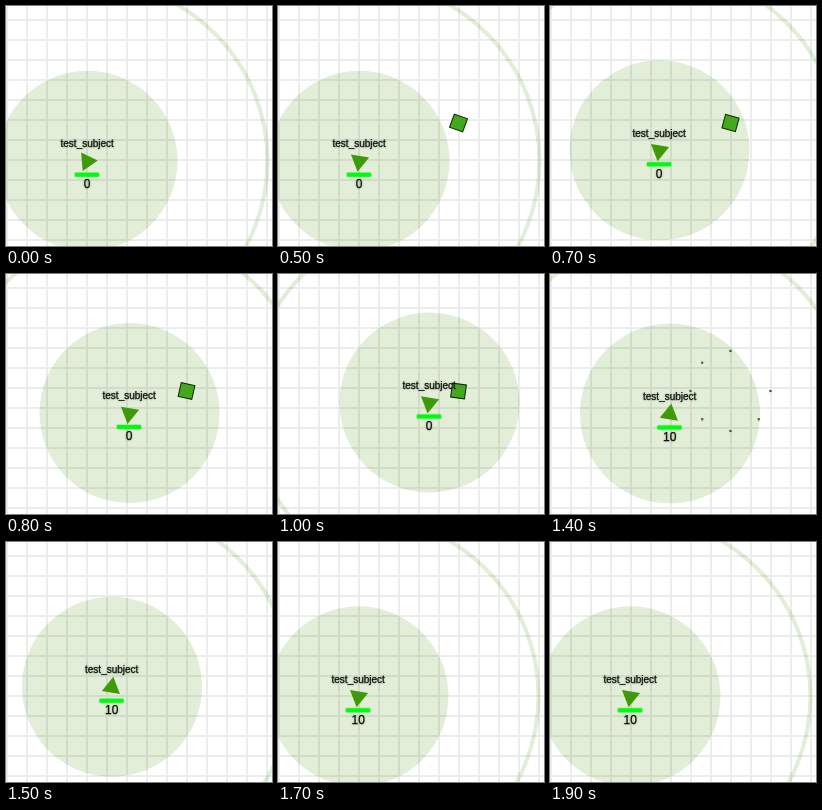
Animation of 266 by 240 pixels, one loop 2000 ms. Source, as an HTML page:

```html
<!DOCTYPE html>
<html lang="en">
<head>
<meta charset="utf-8">
<style>
  html, body { margin: 0; width: 100%; height: 100%; overflow: hidden; background: #fff; }
  svg { display: block; width: 266px; height: 240px; }
  text {
    font-family: "Liberation Sans", Arial, sans-serif;
    text-anchor: middle;
    fill: #111;
    stroke: #111;
    stroke-width: .25;
    filter: drop-shadow(0 0 1px rgba(70, 100, 50, .45));
  }
</style>
</head>
<body>
<svg viewBox="0 0 266 240">
  <defs>
    <pattern id="grid" x="0" y="13" width="20" height="20" patternUnits="userSpaceOnUse">
      <path d="M1 0V20M0 1H20" stroke="#000" stroke-opacity=".075" stroke-width="2"/>
    </pattern>
  </defs>
  <rect width="266" height="240" fill="#fff"/>
  <g class="unit">
    <circle r="90" fill="#e2eed8"/>
    <circle r="180" fill="none" stroke="#e2eed8" stroke-width="4"/>
  </g>
  <rect width="266" height="240" fill="url(#grid)"/>
  <rect id="crate" x="-7" y="-7" width="14" height="14" fill="#43a81e" stroke="#10240a"/>
  <g id="shards"></g>
  <g class="unit">
    <path id="ship" d="M10.6 0L-5.3 9.2V-9.2Z" fill="#3f9a08"/>
    <rect x="-13.5" y="11.3" width="26" height="5.4" rx="2" fill="#00f010" opacity=".3"/>
    <rect x="-12.5" y="12" width="24" height="4" rx="1" fill="#00fa10"/>
    <text x="-.3" y="-13.8" font-size="10">test_subject</text>
    <text id="score" x="-.3" y="27.4" font-size="12">0</text>
  </g>
</svg>
<script>
const LOOP = 2000, STEP = 100;
const HOME = { x: 81.5, y: 154.8 };
const CRATE = { x: 180.5, y: 117 };
const SPEED = 0.14;      // horizontal pixels per ms
const SLOPE = -0.375;
const OUT = -21, BACK = 159;
const SHARD_ANGLES = [0, 45, 90, 135, 180, 225, 270];

const $ = id => document.getElementById(id);
const units = document.querySelectorAll(".unit");
const shards = SHARD_ANGLES.map(() => {
  const shard = document.createElementNS("http://www.w3.org/2000/svg", "rect");
  shard.setAttribute("fill", "#4ea32c");
  shard.setAttribute("stroke", "#35671f");
  shard.setAttribute("stroke-width", ".7");
  return $("shards").appendChild(shard);
});

function unitAt(t) {
  if (t < 500) return { x: HOME.x, y: HOME.y, heading: -5 };
  if (t < 1100) {
    const dx = (t - 500) * SPEED;
    return { x: HOME.x + dx, y: HOME.y + dx * SLOPE, heading: OUT };
  }
  // On arrival the ship hunts back and forth around home.
  const hunting = t >= 1700;
  const turned = hunting && t !== 1800;
  const x = hunting ? (turned ? 80.5 : 82) : 148 - (t - 1200) * SPEED;
  return { x, y: 129 + (x - 148) * SLOPE, heading: turned ? OUT : BACK };
}

function drawShards(t) {
  const age = t - 1200;
  const radius = 18 + age * 0.11;
  const size = 3.5 - age * 0.01;
  const visible = t >= 1100 && t < 1500;
  $("shards").setAttribute("visibility", visible ? "visible" : "hidden");
  if (!visible) return;
  shards.forEach((shard, i) => {
    const a = SHARD_ANGLES[i] * Math.PI / 180;
    shard.setAttribute("x", CRATE.x + radius * Math.cos(a) - size / 2);
    shard.setAttribute("y", CRATE.y + radius * Math.sin(a) - size / 2);
    shard.setAttribute("width", size);
    shard.setAttribute("height", size);
  });
}

function draw(time) {
  const t = Math.floor((time % LOOP) / STEP) * STEP;
  const { x, y, heading } = unitAt(t);
  units.forEach(u => u.setAttribute("transform", `translate(${x} ${y})`));
  $("ship").setAttribute("transform", `translate(-.3 .5) rotate(${heading})`);
  $("score").textContent = t >= 1100 ? "10" : "0";

  const spin = 20 - (t - 500) * 0.024;
  $("crate").setAttribute("transform", `translate(${CRATE.x} ${CRATE.y}) rotate(${spin})`);
  $("crate").setAttribute("visibility", t >= 500 && t < 1100 ? "visible" : "hidden");
  drawShards(t);
}

const start = performance.now();
function tick() {
  draw(performance.now() - start);
  requestAnimationFrame(tick);
}
tick();
</script>
</body>
</html>
```
